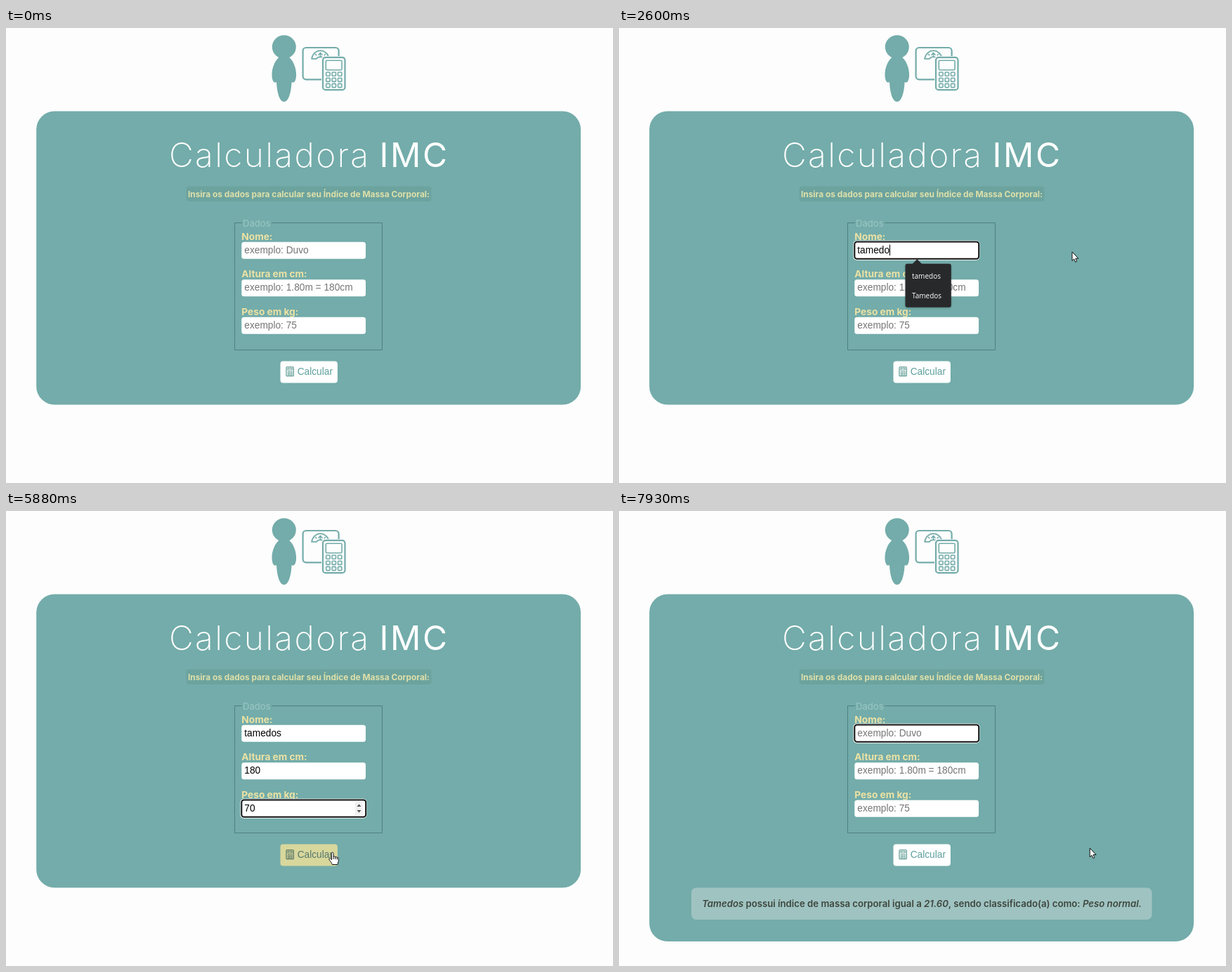
Animation of 864 by 648 pixels, one loop 8000 ms. Source, as an HTML page with a canvas:

```html
<!DOCTYPE html>
<html lang="pt">
<head>
<meta charset="utf-8">
<title>Calculadora IMC</title>
<style>
  html, body { margin: 0; width: 100%; height: 100%; overflow: hidden; background: #fdfdfd; }
  canvas { display: block; width: 864px; height: 648px; }
</style>
</head>
<body>
<canvas id="stage"></canvas>
<script>
const W = 864, H = 648, LOOP = 8000;
const TEAL = '#73acaa', PAGE = '#fdfdfd', CREAM = '#ece2a4';
const SANS = 'Inter, "Open Sans", sans-serif';
const ARIAL = '13.71px "Liberation Sans", Arial, sans-serif';

const canvas = document.getElementById('stage');
const c = canvas.getContext('2d');
const dpr = window.devicePixelRatio || 1;
canvas.width = W * dpr;
canvas.height = H * dpr;

// Timeline, in ms
const SUBMIT = 7000;
const FIELDS = [
  { label: 'Nome:', hint: 'exemplo: Duvo', y: 304.7, value: 'tamedos',
    keys: [1710, 1830, 1960, 2110, 2280, 2480, 2710] },
  { label: 'Altura em cm:', hint: 'exemplo: 1.80m = 180cm', y: 358.2, value: '180',
    keys: [3390, 3460, 3540], number: true },
  { label: 'Peso em kg:', hint: 'exemplo: 75', y: 411.7, value: '70',
    keys: [3980, 4130], number: true }
];
const FOCUS = [
  { field: 0, from: 1110, to: 2990 },
  { field: 1, from: 2990, to: 3740 },
  { field: 2, from: 3740, to: 6600 },
  { field: 0, from: SUBMIT, to: LOOP }
];
const POINTER = [
  [100, 824, 478], [480, 610, 405], [900, 426, 323], [1150, 425, 319],
  [1390, 644.5, 318.7], [4700, 644.5, 318.7], [4780, 641, 336], [5050, 650, 410],
  [5300, 612, 474], [5580, 520, 480], [5950, 452, 488], [6300, 448, 486],
  [7250, 448, 486], [7800, 669.7, 480]
];
const SUGGESTIONS = ['tamedos', 'Tamedos', 'edfsd', 'asfasfa', 'Duvo', 'sdfsd'];

function box(x, y, w, h, r, fill, stroke, line = 1) {
  c.beginPath();
  c.roundRect(x, y, w, h, r);
  if (fill) { c.fillStyle = fill; c.fill(); }
  if (stroke) { c.strokeStyle = stroke; c.lineWidth = line; c.stroke(); }
}

function text(str, x, y, font, color, spacing = 0, align = 'left') {
  c.font = font;
  c.fillStyle = color;
  c.textAlign = align;
  c.letterSpacing = spacing + 'px';
  c.fillText(str, x, y);
  c.letterSpacing = '0px';
}

function shape(d, x, y, fill, stroke, line = 1) {
  const p = new Path2D(d);
  c.save();
  c.translate(x, y);
  if (fill) { c.fillStyle = fill; c.fill(p); }
  if (stroke) {
    c.strokeStyle = stroke;
    c.lineWidth = line;
    c.lineJoin = c.lineCap = 'round';
    c.stroke(p);
  }
  c.restore();
}

function drawIcon() {
  c.fillStyle = TEAL;
  c.beginPath();
  c.ellipse(395.8, 27, 17, 16.7, 0, 0, Math.PI * 2);
  c.fill();
  shape('M-5 40 C-13 45 -17.5 57 -17.3 67 C-17 76 -14 79 -10.8 77 ' +
        'C-10 92 -6.5 105 0 105 C6.5 105 10 92 10.8 77 ' +
        'C14 79 17 76 17.3 67 C17.5 57 13 45 5 40 Z', 395.8, 0, TEAL);

  box(422.6, 28, 51, 45.3, 4.5, PAGE, TEAL, 2.2);
  shape('M-12.5 0 C-9.5 -15.5 9.5 -15.5 12.5 0 L5.5 0 C3.5 -3.5 -3.5 -3.5 -5.5 0 Z',
        447.5, 43.8, null, TEAL, 1.7);
  shape('M0 -8.5 V-3 M-2.5 -5.5 L0 -8.5 L2.5 -5.5 M-7 -6.5 L-5.8 -5 M7 -6.5 L5.8 -5',
        447.5, 43.8, null, TEAL, 1.5);

  box(449, 40, 36, 51, 5, PAGE);
  box(451, 41.8, 31.5, 46.4, 4, PAGE, TEAL, 2.2);
  box(455.3, 46.3, 22.8, 13.4, 1.5, null, TEAL, 1.6);
  for (let i = 0; i < 9; i++)
    box(455.7 + i % 3 * 8.4, 63 + Math.floor(i / 3) * 8.2, 5.4, 5.2, 1, null, TEAL, 1.6);
}

function drawCard(done) {
  box(43.2, 118.6, 774.9, done ? 494.4 : 417.8, 25.7, TEAL);
  text('Calculadora', 232, 198, '200 48px ' + SANS, '#fff', 2.3);
  text('IMC', 531.5, 198, '400 48px ' + SANS, '#fff', 2.6);
  box(256.5, 225.5, 349, 21.5, 4, '#6ca39e');
  text('Insira os dados para calcular seu Índice de Massa Corporal:',
       431, 240.8, '700 11.9px ' + SANS, '#dee0a9', 0, 'center');

  c.strokeStyle = '#4f8180';
  c.lineWidth = 1;
  c.beginPath();
  c.moveTo(336, 277.5);
  c.lineTo(325.5, 277.5);
  c.lineTo(325.5, 458.5);
  c.lineTo(535.5, 458.5);
  c.lineTo(535.5, 277.5);
  c.lineTo(378, 277.5);
  c.stroke();
  text('Dados', 337, 282.5, '400 13.1px ' + SANS, '#9cc6c4');
}

function typed(field, t) {
  if (t >= SUBMIT) return '';
  return field.value.slice(0, field.keys.filter(k => k <= t).length);
}

function drawField(field, t, focus) {
  const y = field.y, value = typed(field, t);
  text(field.label, 335.3, y - 3, '700 13.71px ' + SANS, CREAM);
  if (focus) {
    box(333.5, y - 2, 180, 28, 5, '#fff');
    box(335.3, y - 0.2, 176.9, 24.2, 3.5, '#fff', '#101010', 2);
  } else {
    box(335.3, y, 176.7, 24, 3.5, '#fff');
  }
  text(value || field.hint, 339.3, Math.round(y + 16.2), ARIAL, value ? '#000' : '#757575');
  if (!focus) return;

  if (field.number) {
    c.fillStyle = '#f1f1f1';
    c.fillRect(497, y + 2.5, 11, 18.5);
    shape('M-3 -2.5 L0 -6 L3 -2.5 Z M-3 2.5 L0 6 L3 2.5 Z', 502.5, y + 11.8, '#505050');
  }
  const last = Math.max(focus.from, ...field.keys.filter(k => k <= t && k < focus.to));
  if ((t - last) % 1000 < 500) {
    c.fillStyle = '#000';
    c.fillRect(339.3 + (value ? c.measureText(value).width : 0), y + 3.8, 1, 15.5);
  }
}

function drawButton(hover) {
  const ink = hover ? '#54776c' : '#5b9f9c', icon = hover ? '#456a5f' : '#4b8f86';
  box(390.5, 474.4, 81.4, 31, 4, hover ? '#d8d79c' : '#fff');
  box(399, 482.7, 10.3, 13, 1, null, icon, 1.1);
  box(401, 484.6, 6.3, 2.4, 0, null, icon, 0.9);
  c.fillStyle = icon;
  for (let i = 0; i < 9; i++)
    c.fillRect(400.9 + i % 3 * 2.5, 488.8 + Math.floor(i / 3) * 2.2, 1.7, 1.5);
  text('Calcular', 414.7, 494, ARIAL, ink);
}

function drawPopup(t) {
  if (t < 1110 || t >= 2990) return;
  const items = t < FIELDS[0].keys[0] ? SUGGESTIONS : SUGGESTIONS.slice(0, 2);
  const h = 6.3 + items.length * 27.9;
  c.save();
  c.shadowColor = 'rgba(0,0,0,.25)';
  c.shadowBlur = 3;
  c.shadowOffsetY = 1;
  box(407.5, 335.7, 65.3, h, 3, '#28292b');
  c.restore();
  shape('M-7 7 L0 0 L7 7 Z', 424.3, 329.2, '#28292b');
  items.forEach((s, i) =>
    text(s, 417, 356.6 + i * 27.9, '10px "Open Sans", "Noto Sans", sans-serif', '#fff'));
}

function drawResult() {
  box(103, 536.5, 655.5, 45.5, 7, '#9fc3c1');
  const parts = ['Tamedos', ' possui índice de massa corporal igual a ', '21.60',
                 ', sendo classificado(a) como: ', 'Peso normal.'];
  const font = i => (i % 2 ? '' : 'italic ') + '600 13.2px ' + SANS;
  const widths = parts.map((s, i) => { c.font = font(i); return c.measureText(s).width; });
  let x = 431 - widths.reduce((a, b) => a + b) / 2;
  parts.forEach((s, i) => {
    text(s, x, 563.8, font(i), '#3d463e');
    x += widths[i];
  });
}

function pointerAt(t) {
  if (t < POINTER[0][0]) return null;
  const i = POINTER.findIndex(p => p[0] > t);
  if (i < 0) return POINTER[POINTER.length - 1].slice(1);
  const [t0, x0, y0] = POINTER[i - 1], [t1, x1, y1] = POINTER[i];
  const k = (t - t0) / (t1 - t0);
  return [x0 + (x1 - x0) * k, y0 + (y1 - y0) * k];
}

const inside = (p, x, y, w, h) => p && p[0] >= x && p[0] <= x + w && p[1] >= y && p[1] <= y + h;

function drawPointer(p, hover) {
  const [x, y] = p;
  if (hover) {
    shape('M-1.4 1 C-1.4 -.9 1.4 -.9 1.4 1 V6 C2 5 4 5.2 4.1 6.5 C5 5.6 6.5 6 6.6 7.2 ' +
          'C7.6 6.6 8.6 7.2 8.6 8.4 V12 C8.6 14 7.3 15 7.2 17 H-.4 ' +
          'C-.7 14.5 -3.3 12.5 -4.8 9.8 C-5.3 8.2 -3.5 7.7 -2.6 8.8 L-1.4 10 Z ' +
          'M1.4 6 V9 M4.1 6.5 V9.2 M6.6 7.2 V9.5', x, y, '#fff', '#111');
  } else if (FIELDS.some(f => inside(p, 335, f.y, 177, 24))) {
    shape('M-3 -7 H3 M0 -7 V7 M-3 7 H3', x, y, null, '#111');
  } else {
    shape('M.5 .5 V12.8 L3.2 10.2 L5.2 14.6 L7.2 13.7 L5.3 9.5 H9 Z', x, y, '#fff', '#111');
  }
}

function draw(t) {
  const done = t >= SUBMIT;
  const focus = FOCUS.find(f => t >= f.from && t < f.to);
  const p = pointerAt(t);
  const hover = inside(p, 390.5, 474.5, 81.5, 31);

  c.setTransform(dpr, 0, 0, dpr, 0, 0);
  c.fillStyle = PAGE;
  c.fillRect(0, 0, W, H);
  drawIcon();
  drawCard(done);
  FIELDS.forEach((f, i) => drawField(f, t, focus && focus.field === i ? focus : null));
  drawButton(hover);
  if (done) drawResult();
  drawPopup(t);
  if (p) drawPointer(p, hover);
}

const start = performance.now();
function tick() {
  draw((performance.now() - start) % LOOP);
  requestAnimationFrame(tick);
}
tick();
</script>
</body>
</html>
```
